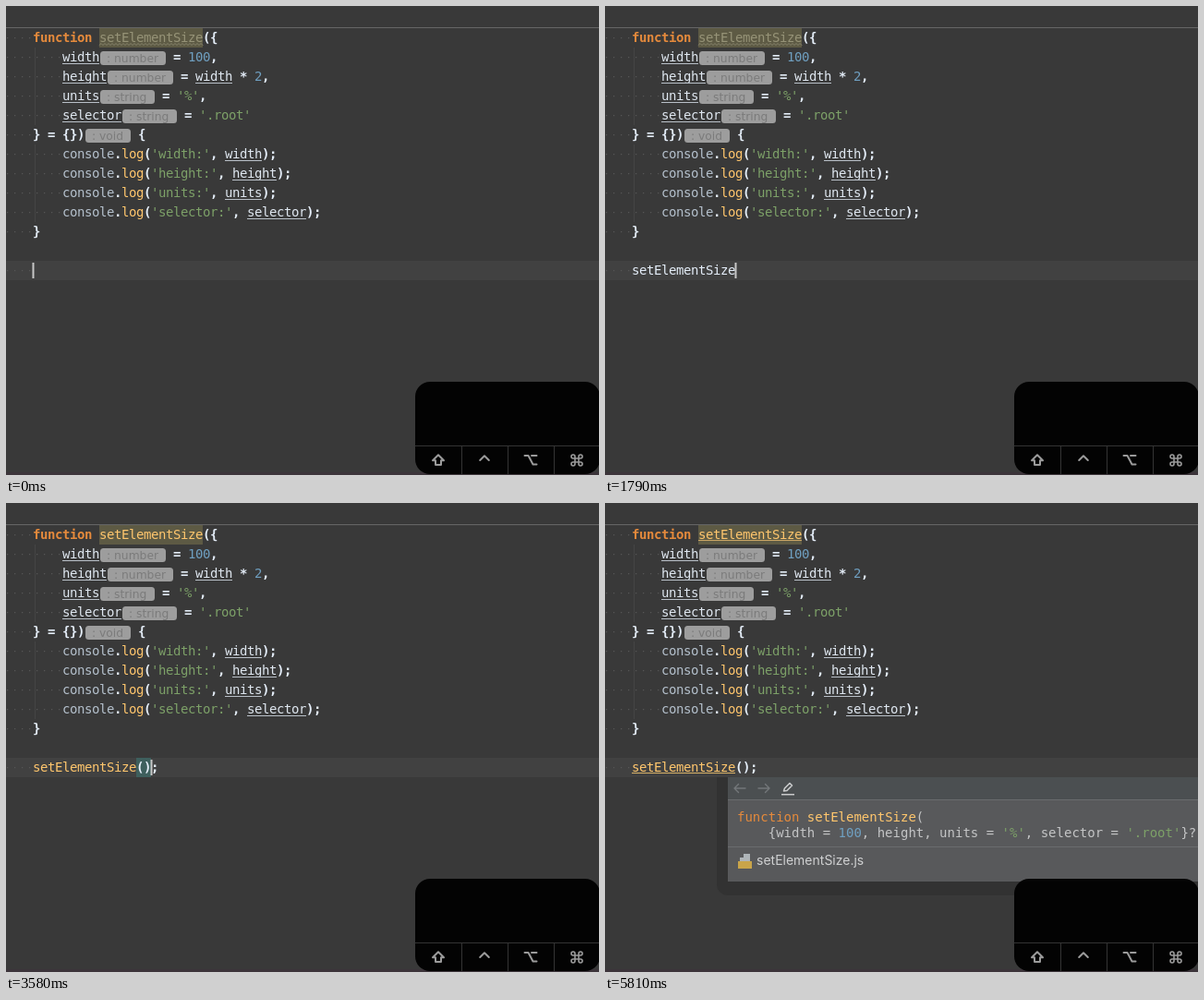
Recreate the animation shown at these times as an HTML page with a canvas. Size 642 by 508 pixels, loop 8 s.

```html
<!DOCTYPE html>
<html lang="en">
<head>
<meta charset="utf-8">
<title>Code editor demo</title>
<style>
html, body { margin: 0; height: 100%; overflow: hidden; background: #393939; }
canvas { display: block; }
</style>
</head>
<body>
<canvas id="stage" width="642" height="508"></canvas>
<script>
const c = document.getElementById('stage').getContext('2d');
const LOOP = 8000, COL = 8, ROW = 21, LEFT = 29, TOP = 24;
const MONO = '"DejaVu Sans Mono", monospace', WIDE = 14 * 0.602;
const COLORS = {
  k: '#e58a3c', p: '#e4edf8', a: '#dfe7f0', n: '#6f9fc0',
  s: '#7da168', o: '#b4c0cc', f: '#ffc66d'
};
const NAME = 'setElementSize';

// Code tokens: [text, style] or [hint, 'hint', width]
const log = word => [['    ', 'p'], ['console', 'o'], ['.', 'p'], ['log', 'f'], ['(', 'p'],
  [`'${word}:'`, 's'], [', ', 'p'], [word, 'a'], [');', 'p']];
const param = (word, type, width, ...value) =>
  [['    ', 'p'], [word, 'a'], [type, 'hint', width], [' = ', 'p'], ...value];
const CODE = [
  [['function ', 'k'], [NAME, 'decl'], ['({', 'p']],
  param('width', 'number', 72, ['100', 'n'], [',', 'p']),
  param('height', 'number', 72, ['width', 'a'], [' * ', 'p'], ['2', 'n'], [',', 'p']),
  param('units', 'string', 60, ["'%'", 's'], [',', 'p']),
  param('selector', 'string', 60, ["'.root'", 's']),
  [['} = {})', 'p'], ['void', 'hint', 50], [' {', 'p']],
  ...['width', 'height', 'units', 'selector'].map(log),
  [['}', 'p']]
];

// Completion rows: [icon, name, details, type]
const SIGN = "({width = 100, height, units = '%', selector = '.roo…";
const TIMER = '(handler: TimerHandler, timeout?: number, ...arguments: any[])';
const word = w => ['', w];
const FN = ['f', NAME, SIGN, 'void'];
const IMMEDIATE = ['g', 'setImmediate'];
const INTERVAL = ['f', 'setInterval', TIMER, 'number'];
const TIMEOUT = ['f', 'setTimeout', TIMER, 'number'];
const STORAGE = ['v', 'sessionStorage', ' (DOM)', 'Storage'];
const LIST_SE = [...[NAME, 'selector', 'source', 'source-map', 'static'].map(word),
  FN, ['g', 'self'], STORAGE, IMMEDIATE, INTERVAL, TIMEOUT];
const LIST_SET = [word(NAME), FN, IMMEDIATE, INTERVAL, TIMEOUT];
const LIST_CALL = [...[' {', ';', '{', ' {}', ' :'].map(word),
  ['f', NAME, SIGN.replace('…', "t'})"), ''],
  ...['this', 'async', 'function', 'export', 'debugger'].map(word)];

const TYPED = [[0, ''], [740, 's'], [890, 'se'], [1040, 'set'], [1790, NAME]];
const CARET = [[0, 0], [300, -1], [740, 1], [890, 2], [1040, 3], [1790, 14], [2230, -1],
  [2530, 15], [2680, 16], [2980, 17], [3580, 16], [3730, 15], [3880, 14], [4020, 13], [5360, -1]];

const KEYS = [
  'M468 486.2L474 492.2H471V497H465V492.2H462Z',
  'M513.2 492L518 487.2L522.8 492',
  'M561.5 487H565.5L570.5 496.5H574.5M569 487H574.5',
  'M616 490H620V494H616ZM616 490H614A2 2 0 1 1 616 488ZM620 490V488A2 2 0 1 1 622 490Z' +
  'M620 494H622A2 2 0 1 1 620 496ZM616 494V496A2 2 0 1 1 614 494Z'
];

const step = (list, t) => list.findLast(e => e[0] <= t)[1];

function rect(x, y, w, h, color, r = 0) {
  c.fillStyle = color;
  c.beginPath();
  c.roundRect(x, y, w, h, r);
  c.fill();
}

function line(path, color, width) {
  c.strokeStyle = color;
  c.lineWidth = width;
  c.stroke(new Path2D(path));
}

function text(s, x, y, color, font) {
  c.font = font;
  c.fillStyle = color;
  c.fillText(s, x, y);
}

// Monospaced text on a fixed grid; returns the x after the last column
function mono(s, x, y, color, bold, pitch = WIDE) {
  [...s].forEach((ch, i) => text(ch, x + i * pitch, y, color, `${bold ? 'bold ' : ''}14px ${MONO}`));
  return x + s.length * pitch;
}

function wave(x, y, w, color) {
  let d = `M${x} ${y + 2}`;
  for (let i = 2; i <= w; i += 2) d += `L${x + i} ${y + (i % 4 ? 0 : 2)}`;
  line(d, color, 0.8);
}

function dots(row, count) {
  for (let i = 0; i < count; i++) rect(1 + i * COL, TOP + row * ROW + 10, 1.3, 1.3, '#565656');
}

function drawCode(used, underlined) {
  rect(31, 45, 1, 84, '#454545');
  rect(31, 150, 1, 84, '#454545');
  CODE.forEach((tokens, row) => {
    const top = TOP + row * ROW, base = top + 15;
    let x = LEFT;
    dots(row, tokens[0][0] === '    ' ? 8 : 4);
    for (const [s, style, width] of tokens) {
      const w = width || s.length * COL;
      if (style === 'hint') {
        rect(x + 1, top + 4, w - 1, 15, '#9d9d9d', 3.5);
        text(': ' + s, x + 8, top + 16, '#7b7b7b', '12.3px "DejaVu Sans", sans-serif');
      } else if (style === 'decl') {
        rect(x, top, w, ROW, '#5d5a44');
        mono(s, x, base, used ? COLORS.f : '#969377', false, COL);
        if (!used) wave(x, base + 1.5, w, '#929077');
        else if (underlined) rect(x, base + 1, w, 1, '#c9a565');
      } else {
        mono(s, x, base, COLORS[style], style === 'k' || style === 'p', COL);
        if (style === 'a') rect(x, base + 2, w, 1, '#b9c0c8');
      }
      x += w;
    }
  });
}

function drawCall(t, used, underlined) {
  const name = step(TYPED, t), base = 291, caret = step(CARET, t);
  const tail = (t >= 2530 ? '()' : '') + (t >= 2980 ? ';' : '');
  const matched = (t >= 2530 && t < 2980) || (t >= 3580 && t < 4020);
  dots(12, 4);
  if (matched) rect(141, 276, 16, ROW, '#3e5f5d');
  const x = mono(name, LEFT, base, used ? COLORS.f : COLORS.p, false, COL);
  mono(tail, x, base, COLORS.p, true, COL);
  if (underlined) rect(LEFT, base + 1, 112, 1, '#d8b268');
  if (t >= 3280 && t < 3430) wave(LEFT, base + 1.5, 112, '#8a8a78');
  if (caret >= 0) rect(LEFT - 0.5 + caret * COL, 278, 2, 17, '#c8c8c8');
}

function shadow(x, h) {
  rect(x - 12, 297, 600, h + 15, 'rgba(0,0,0,.13)', [0, 0, 0, 12]);
}

function rowIcon(kind, x, y) {
  if (kind === 'g') {
    line(`M${x - 2} ${y - 5}A6 6 0 0 1 ${x + 4} ${y + 3}`, '#c2a04c', 2);
    line(`M${x} ${y - 6.5}A7 7 0 0 1 ${x + 6.5} ${y + 1}`, '#62a05c', 1.7);
    rect(x - 6.5, y - 2, 8.5, 8.5, '#4a9fc0', 4.3);
    return;
  }
  rect(x - 7, y - 7, 14, 14, kind === 'f' ? '#bd7782' : '#bd9045', 7);
  c.textAlign = 'center';
  text(kind, x, y + 3.5, '#46343a', '10px "DejaVu Sans", sans-serif');
  c.textAlign = 'left';
}

function drawList(rows, x, prefix) {
  if (x > 20) shadow(x, 211);
  rect(x, 297, 660, 211, '#595a5c');
  rect(x, 297, 660, 20, '#65666a');
  rows.forEach(([icon, name, details = '', type = ''], i) => {
    const base = 311 + i * 20;
    const hit = prefix && name.startsWith(prefix) ? prefix : '';
    if (icon) rowIcon(icon, x + 14, base - 4);
    let end = mono(hit, x + 26, base, '#6ab0f5', !icon);
    end = mono(name.slice(hit.length), end, base, '#d2d3d4', !icon);
    const room = type ? Math.floor((650 - type.length * WIDE - end) / WIDE) : 99;
    mono(details.slice(0, room), end, base, '#a0a1a2');
    mono(type, 654 - type.length * WIDE, base, '#a0a1a2');
  });
}

function drawDoc(t) {
  shadow(133, 113);
  rect(133, 297, 520, 113, '#58595b');
  rect(133, 297, 520, 24, '#4b4f51');
  rect(133, 321, 520, 1, '#6a6c6e');
  rect(133, 372, 520, 1, '#6a6c6e');
  if (t >= 5810) {
    line('M152 309H140M144.5 304.5L140 309L144.5 313.5', '#73777a', 1.4);
    line('M166 309H178M173.5 304.5L178 309L173.5 313.5', '#73777a', 1.4);
    line('M193.5 312L194.5 309L200 303.5L202.5 306L197 311.5Z', '#c9cacb', 1.6);
    rect(191, 315, 14, 1.5, '#c9cacb');
  }
  const run = (x, y, ...parts) => parts.forEach(([s, color]) => x = mono(s, x, y, color));
  const grey = '#c4c5c6';
  run(143, 345, ['function ', COLORS.k], [NAME, COLORS.f], ['(', grey]);
  run(176.7, 362, ['{width = ', grey], ['100', COLORS.n], [', height, units = ', grey],
    ["'%'", COLORS.s], [', selector = ', grey], ["'.root'", COLORS.s], ['}?', grey]);
  rect(150, 380, 7, 8, '#aeb4b8');
  rect(146, 384, 11, 4, '#aeb4b8');
  rect(144, 388, 15, 8, '#c9a44a');
  text(NAME + '.js', 164, 392, '#cfd0d1', '14px Inter, sans-serif');
}

function drawKeys(t) {
  const shift = t >= 2230 && t < 2680, ctrl = t >= 4920 && t < 5810;
  rect(443, 407, 200, 100, 'rgba(0,0,0,.94)', 16);
  rect(443, 476, 200, 1, '#343434');
  for (const x of [493, 543, 593]) rect(x, 476, 1, 31, '#343434');
  KEYS.forEach((d, i) => line(d, (i === 0 && shift) || (i === 1 && ctrl) ? '#fff' : '#9b9b9b', i === 3 ? 1.6 : 2));
  if (ctrl && t >= 5360) {
    line('M516 441.5L530.5 427.5L545 441.5', '#fff', 4.2);
    c.textAlign = 'right';
    text('J', 577, 460, '#fff', '46px Inter, sans-serif');
    c.textAlign = 'left';
  }
}

function draw(t) {
  const used = t >= 2230, underlined = used && (t < 3280 || t >= 4470);
  rect(0, 0, 642, 508, '#393939');
  rect(0, 23, 642, 1, '#666');
  rect(0, 276, 642, ROW, '#414141');
  rect(0, 505, 642, 3, '#3c343a');
  drawCode(used, underlined);
  drawCall(t, used, underlined);
  if (t >= 890 && t < 1790) drawList(t < 1040 ? LIST_SE : LIST_SET, 3, step(TYPED, t));
  if (t >= 2830 && t < 2980) drawList(LIST_CALL, 131, '');
  if (t >= 5510) drawDoc(t);
  drawKeys(t);
}

c.lineCap = c.lineJoin = 'round';
const start = performance.now();
function tick() {
  draw((performance.now() - start) % LOOP);
  requestAnimationFrame(tick);
}
tick();
</script>
</body>
</html>
```
